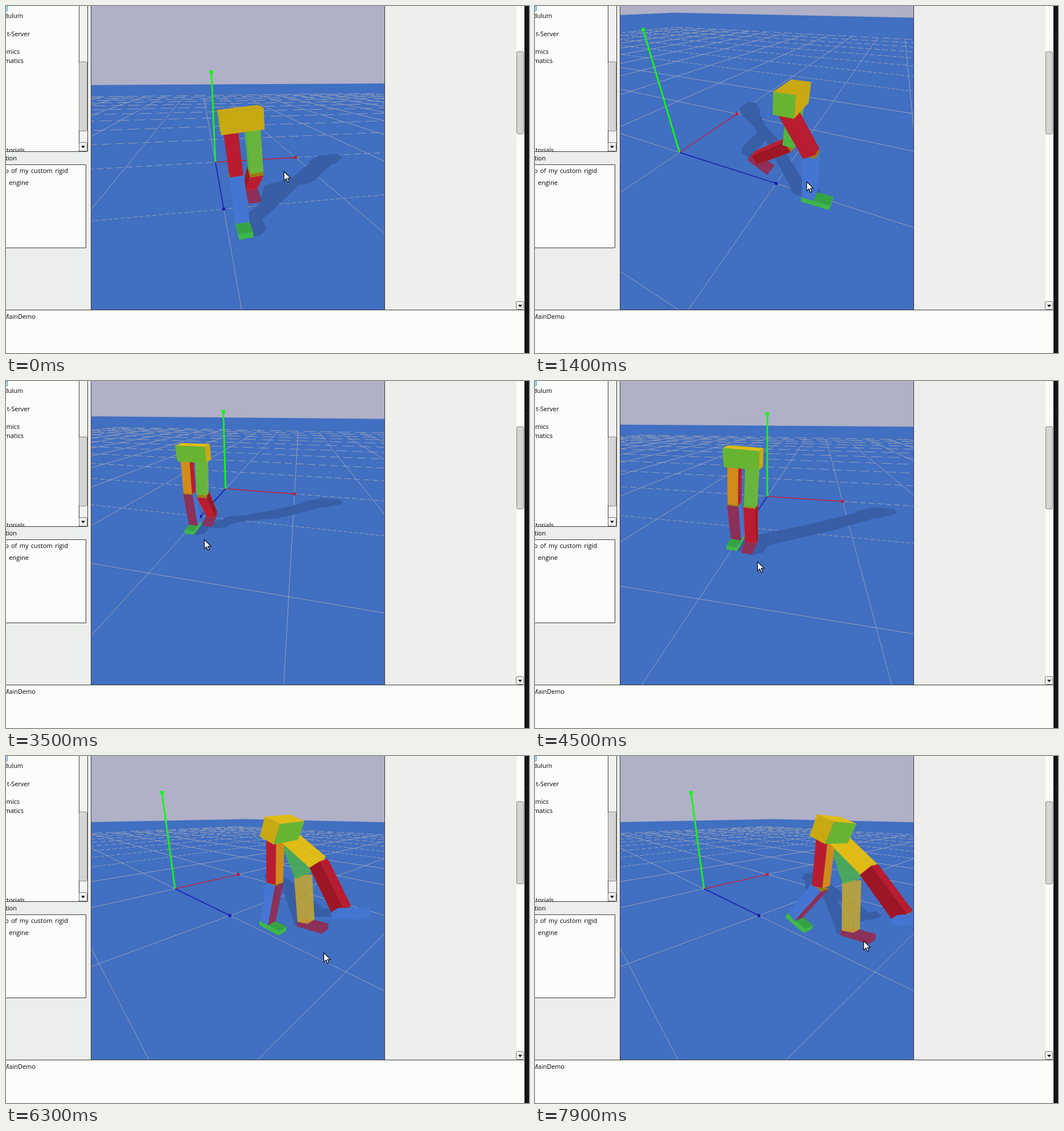
Write an HTML page with a canvas that moves like this. It is 919x609 px and loops after 8000 ms.

```html
<!DOCTYPE html>
<html lang="en">
<head>
<meta charset="utf-8">
<title>Walker simulation</title>
<style>
html, body { margin: 0; width: 100%; height: 100%; overflow: hidden; background: #eceeeb; }
svg, canvas { position: absolute; top: 0; left: 0; display: block; }
canvas { left: 150px; }
text { font: 11px "Open Sans", "Noto Sans", sans-serif; fill: #000; text-anchor: end; }
.paper { fill: #fcfdfa; }
.line { fill: none; stroke: #3c3c3c; }
.thumb { fill: #d5d5d4; stroke: #858585; }
.button { fill: #f0f0ee; stroke: #777; }
</style>
</head>
<body>
<svg width="919" height="609" viewBox="0 0 919 609">
  <rect class="paper" width="143" height="255"/>
  <rect x="128" width="15" height="255" fill="#f2f3f0"/>
  <path d="M0 0H2.5V8.5H0" fill="#a8dcf4" stroke="#4c9cc8"/>
  <text x="30" y="21">dulum</text>
  <text x="42" y="53">t-Server</text>
  <text x="24" y="84">amics</text>
  <text x="31" y="100">matics</text>
  <text x="33" y="257">utorials</text>
  <rect y="256" width="149" height="22" fill="#eceeeb"/>
  <text x="19" y="271">tion</text>
  <path class="line" d="M128.5 0V255M143.5 0V255.5H0"/>
  <rect class="thumb" x="128.5" y="98" width="14" height="121.5" rx="2"/>
  <rect class="button" x="128.5" y="239.5" width="14" height="15" rx="2"/>
  <path d="M132 245.5h7l-3.5 4z"/>
  <rect class="paper" y="278" width="140" height="146"/>
  <path class="line" d="M0 278.5H140.5V424.5H0"/>
  <text x="109" y="293" word-spacing="1.5">o of my custom rigid</text>
  <text x="40" y="314">engine</text>

  <rect x="666" width="231" height="533" fill="#eeeeed"/>
  <rect class="paper" x="897" width="13" height="533"/>
  <rect class="thumb" x="897.5" y="80" width="12" height="144.5" rx="2"/>
  <rect class="button" x="896.5" y="518.5" width="13" height="14" rx="2"/>
  <path d="M900 524.5h7l-3.5 4z"/>
  <rect class="paper" y="534" width="911" height="75"/>
  <path class="line" d="M149.5 0V533M665.5 0V533M0 533.5H911"/>
  <text x="52" y="549">MainDemo</text>
  <rect x="911" width="8" height="609" fill="#121416"/>
  <path d="M911 56.5H919" stroke="#26282a"/>
</svg>
<canvas id="view" width="515" height="533"></canvas>

<script>
const ctx = document.getElementById('view').getContext('2d');
const { sin, cos, min, max, abs, floor } = Math;

// cam: where the world origin appears (x, y, depth), yaw, pitch
// body: pelvis x, z and sideways roll; legs: thigh and shin swing from vertical
const keys = [
  { at: 0, cam: [368, 274, 2.55, .159, .414], cursor: [488, 290],
    body: [.1, 1.15, .1], left: [.1, .15], right: [.05, -.8] },
  { at: 12, cam: [254, 257, 2.03, 1.1125, .663], cursor: [477, 308],
    body: [-.05, 1.1, 0], left: [.62, .1], right: [-.05, -.95] },
  { at: 21, cam: [306, 209, 2.92, .456, .482], cursor: [384, 292],
    body: [.01, 1.35, .12], left: [.25, .05], right: [.15, -1.1] },
  { at: 33, cam: [386, 189, 3.2, -.236, .57], cursor: [348, 278],
    body: [.12, 1.27, 0], left: [.1, -.1], right: [.15, -.6] },
  { at: 52, cam: [428, 214.5, 2.77, -.184, .513], cursor: [429, 352],
    body: [.105, 1.38, -.1], left: [.1, -.2], right: [.1, .3] },
  { at: 61, cam: [297, 233, 2.525, .7325, .4615], cursor: [558, 345],
    body: [.12, 1.39, .04], left: [.05, -.15], right: [1.05, .65] },
  { at: 77, cam: [297, 233, 2.525, .7325, .4615], cursor: [577, 324],
    body: [.15, 1.53, -.06], left: [.05, -.6], right: [1, .85] }
];

const sky = '#b0b0c7', ground = '#416fc1', gridColor = '#969fb9', shade = '#385fa6';
const yellow = '#c9a911', gold = '#dfbc16', green = '#67b433', red = '#b91c30', dark = '#9c1626';
const blue = '#4575d2', orange = '#d08b1c', brown = '#9a7a14', plum = '#8c3058';
const grass = '#3fb84a', moss = '#36a343';
const ghostly = { thigh: 'rgba(74,180,70,.8)', shin: 'rgba(198,168,50,.87)', foot: plum };

// Paint of a box: side, front, top. The overlapping bodies trade places on the way.
function paints(step) {
  const turned = step >= 27;
  return {
    pelvis: step < 17 ? [green, yellow, yellow] : [yellow, green, gold],
    left: [[red, turned ? orange : red, orange], [blue, turned ? plum : blue, brown], [grass, grass, moss]],
    right: [[turned ? gold : green, gold, gold], [dark, red, brown], [blue, blue, blue]],
    ghost: [ghostly.thigh, ghostly.shin, ghostly.foot].map(c => [c, c, c])
  };
}

const mix = (a, b, u) => a.map((v, i) => v + (b[i] - v) * u);
const flat = ([x, y, w]) => [x / w, y / w];

function path(pts) {
  ctx.beginPath();
  pts.forEach(p => ctx.lineTo(p[0], p[1]));
}

function fill(pts, color) {
  path(pts);
  ctx.fillStyle = color;
  ctx.fill();
}

// Maps a world point to homogeneous screen coordinates
function camera([ox, oy, depth, yaw, pitch]) {
  const focal = 378, cx = 407.5, cy = 290;
  return ([x, y, z]) => {
    const ahead = x * sin(yaw) - z * cos(yaw);
    const right = (ox - cx) / focal * depth + x * cos(yaw) + z * sin(yaw);
    const up = (cy - oy) / focal * depth + y * cos(pitch) + ahead * sin(pitch);
    const w = depth + ahead * cos(pitch) - y * sin(pitch);
    return [cx * w + focal * right, cy * w - focal * up, w];
  };
}

// Cuts away what lies behind the eye
function clipNear(pts) {
  const near = .08, out = [];
  pts.forEach((p, i) => {
    const q = pts[(i + 1) % pts.length];
    if (p[2] >= near) out.push(p);
    if ((p[2] >= near) !== (q[2] >= near)) out.push(mix(p, q, (near - p[2]) / (q[2] - p[2])));
  });
  return out.map(flat);
}

function gridLine(p, q) {
  const line = clipNear([p, q]).slice(0, 2);
  if (line.length < 2) return;
  const slope = abs((line[1][1] - line[0][1]) / (line[1][0] - line[0][0]));
  const run = min(30, 1 / max(slope, .01));
  ctx.setLineDash(slope < .13 ? [run * .7, run * .3] : []);
  path(line);
  ctx.stroke();
}

function drawGround(view) {
  const at = (x, z) => view([x, 0, z]), edge = 28;
  ctx.fillStyle = sky;
  ctx.fillRect(150, 0, 515, 533);
  fill(clipNear([at(-edge, -edge), at(edge, -edge), at(edge, edge), at(-edge, edge)]), ground);
  ctx.lineWidth = 1;
  ctx.strokeStyle = gridColor;
  for (let n = -10; n <= 10; n++) {
    gridLine(at(n, -10), at(n, 10));
    gridLine(at(-10, n), at(10, n));
  }
  ctx.setLineDash([]);
}

function drawAxis(view, end, color, width, knob) {
  const tip = flat(view(end));
  path([flat(view([0, 0, 0])), tip]);
  ctx.lineWidth = width;
  ctx.strokeStyle = ctx.fillStyle = color;
  ctx.stroke();
  ctx.fillRect(tip[0] - knob / 2, tip[1] - knob / 2, knob, knob);
}

// A point reached from a joint by going down and forward along a swung limb
const along = ([x, y, z], swing, down, front) =>
  [x, y - down * cos(swing) + front * sin(swing), z + down * sin(swing) + front * cos(swing)];

// Eight corners of a limb hanging from its joint; bits: right, bottom, front
function box(joint, swing, [width, length, thick], paint, reach = 0) {
  const corners = [...Array(8).keys()].map(i => {
    const p = along(joint, swing, (i >> 1 & 1) * length, ((i >> 2) - .5) * thick + reach);
    p[0] += ((i & 1) - .5) * width;
    return p;
  });
  return { corners, paint };
}

const faces = [
  { ring: [0, 4, 6, 2], tone: 0 }, { ring: [1, 5, 7, 3], tone: 0 },
  { ring: [0, 1, 3, 2], tone: 1 }, { ring: [4, 5, 7, 6], tone: 1 },
  { ring: [0, 1, 5, 4], tone: 2 }, { ring: [2, 3, 7, 6], tone: 2 }
];

function leg(x, [thigh, shin], paint) {
  const hip = [x, -.05, 0];
  const knee = along(hip, thigh, .28, 0);
  const ankle = along(knee, shin, .32, 0);
  return [
    box(hip, thigh, [.08, .28, .08], paint[0]),
    box(knee, shin, [.09, .32, .08], paint[1]),
    box(ankle, shin / 2, [.09, .04, .19], paint[2], .05)
  ];
}

function walker([px, pz, roll], left, right, paint) {
  const lean = -.3 * max(0, right[0]);
  const pelvis = box(along([0, 0, 0], lean, -.06, 0), lean, [.25, .12, .12], paint.pelvis);
  const [thigh, shin, foot] = leg(.065, [min(right[0], .55), min(right[1], .2)], paint.ghost);
  const parts = [shin, ...leg(-.065, left, paint.left), ...leg(.065, right, paint.right), thigh, foot, pelvis];
  for (const part of parts) {
    part.corners = part.corners.map(([x, y, z]) =>
      [px + x * cos(roll) - y * sin(roll), .7 + x * sin(roll) + y * cos(roll), pz + z]);
  }
  return parts;
}

function drawShadow(view, parts) {
  ctx.strokeStyle = shade;
  ctx.lineWidth = .6;
  for (const { corners } of parts) {
    const cast = corners.map(([x, y, z]) => flat(view([x + 1.77 * y, 0, z - 1.46 * y])));
    for (const { ring } of faces) {
      fill(ring.map(i => cast[i]), shade);
      ctx.stroke();
    }
  }
}

function drawWalker(view, parts) {
  const depth = pts => Math.round(pts.reduce((sum, p) => sum + p[2], 0) / pts.length * 1000);
  const farFirst = (a, b) => b.depth - a.depth;
  parts
    .map(({ corners, paint }) => ({ pts: corners.map(view), paint }))
    .map(part => ({ ...part, depth: depth(part.pts) }))
    .sort(farFirst)
    .forEach(({ pts, paint }) => faces
      .map(({ ring, tone }) => ({ pts: ring.map(i => pts[i]), tone }))
      .map(face => ({ ...face, depth: depth(face.pts) }))
      .sort(farFirst)
      .slice(3)
      .forEach(face => fill(face.pts.map(flat), paint[face.tone])));
}

function drawCursor([x, y]) {
  const arrow = [[0, 0], [0, 16], [4, 12.5], [6.5, 18.5], [9, 17.5], [6.5, 11.5], [11.5, 11.5]];
  path(arrow.map(p => [p[0] + x + .5, p[1] + y + .5]));
  ctx.closePath();
  ctx.fillStyle = '#fff';
  ctx.strokeStyle = '#111';
  ctx.lineWidth = 1.2;
  ctx.fill();
  ctx.stroke();
}

function draw(step) {
  const k = max(0, keys.findIndex(key => key.at >= step) - 1);
  const from = keys[k], to = keys[k + 1];
  const now = name => mix(from[name], to[name], (step - from.at) / (to.at - from.at));

  const view = camera(now('cam'));
  const parts = walker(now('body'), now('left'), now('right'), paints(step));
  drawGround(view);
  drawShadow(view, parts);
  drawAxis(view, [1, 0, 0], '#c01c38', 1.5, 5);
  drawAxis(view, [0, 0, 1], '#1414b4', 1.5, 5);
  drawAxis(view, [0, .97, 0], '#14f514', 3, 6);
  drawWalker(view, parts);
  drawCursor(now('cursor'));
}

ctx.translate(-150, 0);
function tick() {
  const t = performance.now() % 8000;
  draw(t < 300 ? 0 : floor(t / 100) - 2);
  requestAnimationFrame(tick);
}
tick();
</script>
</body>
</html>
```
